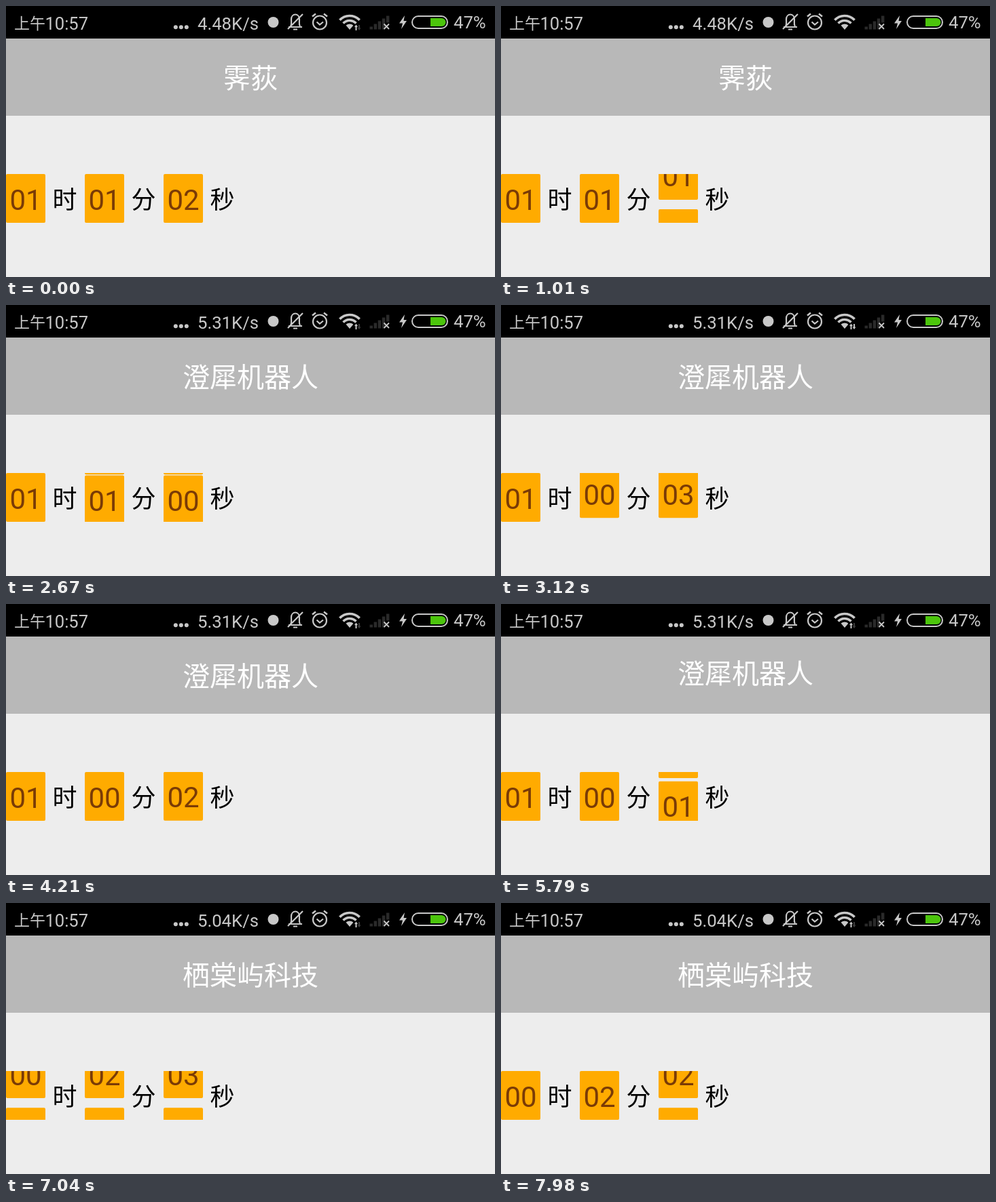
Recreate the animation shown at these times as an HTML page with a canvas. Size 720 px wide and 400 px high, loop 8 s.

```html
<!DOCTYPE html>
<html lang="zh-CN">
<head>
<meta charset="utf-8">
<title>倒计时</title>
<style>
html, body { margin: 0; width: 100%; height: 100%; overflow: hidden; background: #ededed; }
canvas { display: block; width: 720px; height: 400px; }
</style>
</head>
<body>
<canvas id="stage" width="720" height="400"></canvas>
<script>
const c = document.getElementById('stage').getContext('2d');
const LOOP = 8000, GREY = '#c8c8c8';
const LATIN = 'Roboto, "Noto Sans", sans-serif';
const HAN = '"Noto Sans CJK SC", "Noto Sans CJK", sans-serif';

// Start time of each flip and the state it leads to
const ticks = [
  [-1000, ['01', '01', '02']],
  [680, ['01', '01', '01']],
  [1693, ['01', '01', '00']],
  [2599, ['01', '00', '03']],
  [3590, ['01', '00', '02']],
  [4605, ['01', '00', '01']],
  [5643, ['01', '00', '00']],
  [6698, ['00', '02', '03']],
  [7638, ['00', '02', '02']]
];
const titles = [[-1000, '霁荻'], [1728, '澄犀机器人'], [5738, '栖棠屿科技']];
const speeds = [[-1000, '4.48K/s'], [2100, '5.31K/s'], [6100, '5.04K/s']];
// Data arrows beside the wifi sign: 0 none, 1 one lit, 2 both lit
const traffic = [[-1000, 1], [30, 0], [2100, 1], [2700, 2], [3700, 1]];

const indexAt = (list, t) => list.findLastIndex(e => e[0] <= t);
const valueAt = (list, t) => list[indexAt(list, t)][1];
const ease = p => (1 - Math.cos(Math.PI * Math.min(1, Math.max(0, p)))) / 2;

function text(s, x, y, size, color, family = LATIN, align = 'left') {
  c.font = `${size}px ${family}`;
  c.textAlign = align;
  c.fillStyle = color;
  c.fillText(s, x, y);
}

function rect(x, y, w, h, color) {
  c.fillStyle = color;
  c.fillRect(x, y, w, h);
}

function dot(x, y, r, color = GREY) {
  c.beginPath();
  c.arc(x, y, r, 0, 7);
  c.fillStyle = color;
  c.fill();
}

function line(d, width = 2, color = GREY) {
  c.lineWidth = width;
  c.strokeStyle = color;
  c.stroke(new Path2D(d));
}

function fill(d, color = GREY) {
  c.fillStyle = color;
  c.fill(new Path2D(d));
}

// Old content leaves in direction dir while new content follows, inside a clip box
function flip(x, y, w, h, dir, age, outMs, inMs, before, after, draw) {
  c.save();
  c.beginPath();
  c.rect(x, y, w, h);
  c.clip();
  if (before === after) {
    draw(after, 0);
  } else {
    if (age < outMs) draw(before, dir * h * ease(age / outMs));
    draw(after, -dir * h * (1 - ease(age / inMs)));
  }
  c.restore();
}

function statusBar(t) {
  rect(0, 0, 720, 48, '#000');
  text('上午', 12, 34, 23, GREY, HAN);
  text('10:57', 57.5, 35, 25.5, GREY);
  for (const x of [249.8, 257.8, 265.8]) dot(x, 31.3, 3);
  text(valueAt(speeds, t), 372, 35, 25.7, GREY, LATIN, 'right');
  dot(393.5, 24, 8);

  // Muted bell
  line('M416 31H436M419 30C421 27 420 24 420 20C420 10 432 10 432 20C432 24 431 27 433 30', 2.2);
  line('M423 34.500H429M437 12L415 34', 2.2);

  // Alarm clock
  line('M472 24.500A10 10 0 1 1 452 24.500A10 10 0 1 1 472 24.500M457.500 23.500L462 27.500L467 23.500', 2.2);
  line('M451 15.500L456 11.500M468 11.500L473 15.500', 2.5);

  // Wifi
  for (const r of [20, 13]) {
    c.beginPath();
    c.arc(506, 34.5, r, -Math.PI * .76, -Math.PI * .24);
    c.lineWidth = 3.6;
    c.strokeStyle = GREY;
    c.stroke();
  }
  fill('M506 35L500.500 28.500Q506 24.500 511.500 28.500Z');
  const arrows = valueAt(traffic, t);
  if (arrows) {
    rect(511, 27, 12, 10, '#000');
    fill('M515.500 27.500L518 31H516.500V36H514.500V31H513Z');
    fill('M520 36L517.500 32.500H519V28H521V32.500H522.500Z', arrows > 1 ? GREY : '#3c3c3c');
  }

  // No mobile signal
  for (let i = 0; i < 5; i++) {
    const h = 4 + i * 4;
    rect(535.5 + i * 6.1, 34.5 - h, 4.5, i < 4 ? h : 10, '#2a2a2a');
  }
  line('M556.500 26.500L564 34M564 26.500L556.500 34', 1.8);

  // Charging battery
  fill('M587 14L579 25.500H584L582 34L590 22H585.500Z');
  c.beginPath();
  c.roundRect(598, 15, 52, 18, 9);
  c.lineWidth = 2;
  c.strokeStyle = GREY;
  c.stroke();
  c.beginPath();
  c.roundRect(625, 18, 22.5, 12, [0, 6, 6, 0]);
  c.fillStyle = '#4cc50c';
  c.fill();
  text('47%', 659, 33, 25.7, GREY);
}

function header(t) {
  rect(0, 48, 720, 114, '#b8b8b8');
  const i = indexAt(titles, t), [start, now] = titles[i];
  const old = i ? titles[i - 1][1] : now;
  flip(0, 79, 720, 53, -1, t - start, 300, 600, old, now,
    (s, dy) => text(s, 360, 121 + dy, 40, '#fff', HAN, 'center'));
}

function countdown(t) {
  const i = indexAt(ticks, t), [start, now] = ticks[i];
  const old = i ? ticks[i - 1][1] : now;
  ['时', '分', '秒'].forEach((unit, k) => {
    const x = k * 116;
    flip(x, 248, 58, 72, 1, t - start, 512, 640, old[k], now[k], (s, dy) => {
      c.beginPath();
      c.roundRect(x, 248 + dy, 58, 72, 2);
      c.fillStyle = '#ffab00';
      c.fill();
      text(s, x + 29, 300.5 + dy, 42, '#7a3b06', LATIN, 'center');
    });
    text(unit, x + 86.5, 298.5, 36, '#000', HAN, 'center');
  });
}

function frame() {
  const t = performance.now() % LOOP;
  rect(0, 0, 720, 400, '#ededed');
  statusBar(t);
  header(t);
  countdown(t);
  requestAnimationFrame(frame);
}
frame();
</script>
</body>
</html>
```
